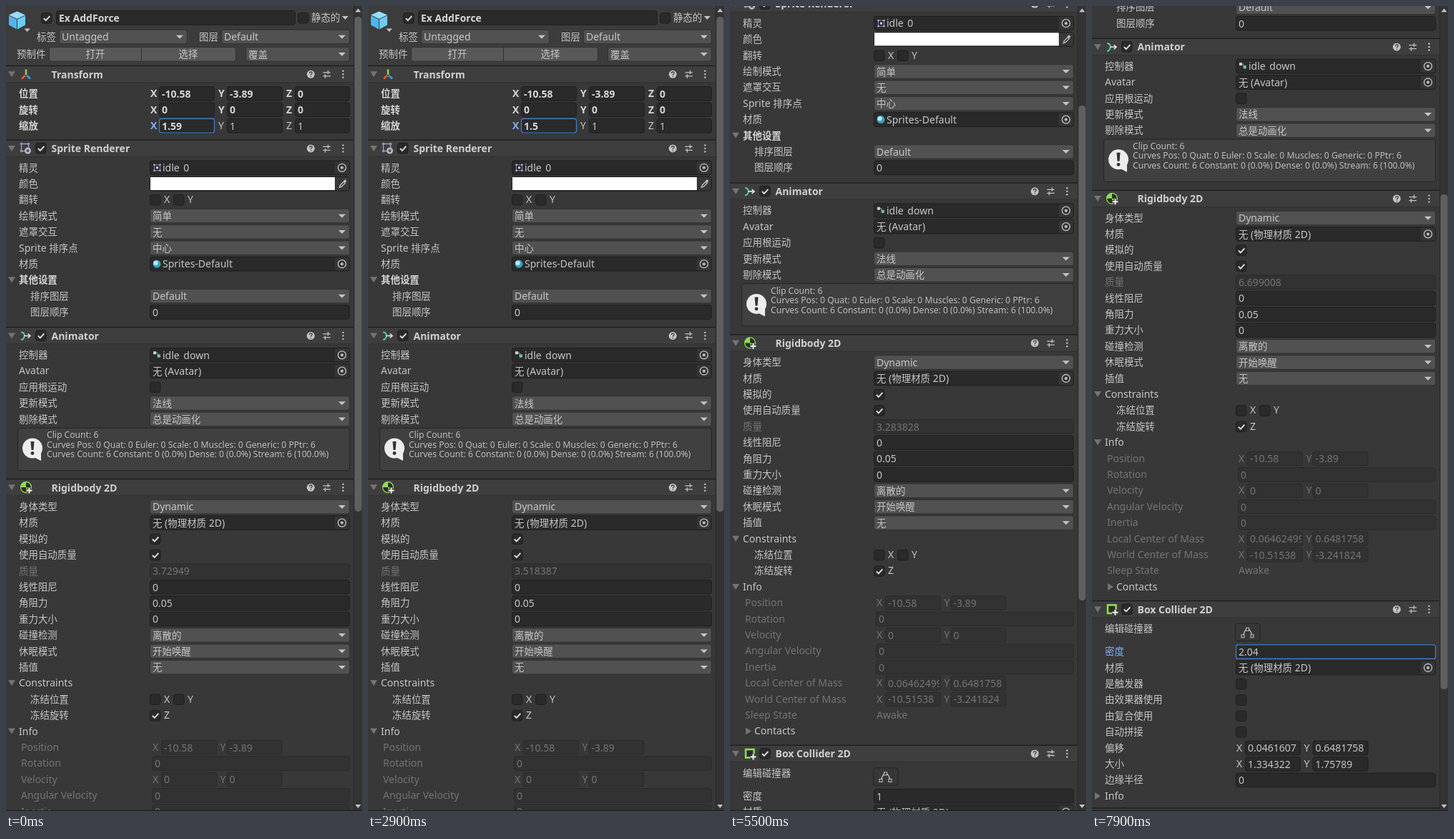
Write an HTML page that moves like this. It is 498 px wide and 1124 px high and loops after 8000 ms.

```html
<!DOCTYPE html>
<html lang="zh-CN">
<head>
<meta charset="utf-8">
<title>Inspector</title>
<style>
html, body { margin: 0; width: 100%; height: 100%; overflow: hidden; background: #383838; }
#stage { display: block; width: 498px; height: 1124px; }
text { font: 14px "Noto Sans", "Noto Sans CJK SC", sans-serif; fill: #c6c6c6; white-space: pre; }
text tspan { font-family: "Noto Sans CJK SC", "Noto Sans CJK JP", "Noto Sans", sans-serif; font-size: 13.44px; }
text.b { font-weight: 600; fill: #d6d6d6; }
text.h { font-weight: 600; fill: #d0d0d0; }
text.off { fill: #747474; }
text.on { fill: #7fb0f8; }
text.s { font-size: 12.15px; fill: #bdbdbd; }
text.m { text-anchor: middle; }
text.gap { word-spacing: 2px; }
.field { fill: #2a2a2a; stroke: #1f1f1f; }
.dim { fill: #323232; stroke: #2b2b2b; }
.drop { fill: #515151; stroke: #313131; }
.tri { fill: #747474; }
.arrow { fill: #c4c4c4; }
.line { fill: none; stroke: #c4c4c4; stroke-width: 1.3; }
.ring { fill: none; stroke-width: 1.2; }
</style>
</head>
<body>
<svg id="stage" viewBox="0 0 498 1124"></svg>
<script>
const PITCH = 22.4, LOOP = 8000, MASS_PER_SCALE = 2.3455912;
const out = [];
const add = s => out.push(s);

const rect = (x, y, w, h, attrs) => add(`<rect x="${x}" y="${y}" width="${w}" height="${h}" ${attrs}/>`);
const path = (d, attrs) => add(`<path d="${d}" ${attrs}/>`);
const dot = (x, y, r, attrs) => add(`<circle cx="${x}" cy="${y}" r="${r}" ${attrs}/>`);
const text = (x, y, s, cls = '', id = '') => {
  const body = s.replace(/[\u4e00-\u9fff]+/g, '<tspan>$&</tspan>');
  add(`<text x="${x}" y="${y}" class="${cls}" ${id && `id="${id}"`}>${body}</text>`);
};
const label = (x, c, s, cls, id) => text(x, c + 4.7, s, cls, id);
const box = (x, c, w, cls) => rect(x + .5, c - 9.8, w - 1, 19.6, `rx="3" class="${cls}"`);

function field(x, c, w, s, cls = '', id = '') {
  box(x, c, w, cls === 'off' ? 'dim' : 'field');
  add(`<svg x="${x + 1}" y="${c - 9}" width="${w - 3}" height="18">`);
  text(3, 14.4, s, cls, id);
  add('</svg>');
}
function drop(c, s, x = 201, w = 280) {
  box(x, c, w, 'drop');
  text(x + 4, c + 5.2, s);
  path(`M${x + w - 16} ${c - 2.3}h10l-5 5z`, 'class="arrow"');
}
function object(c, s, x = 205, cls = '') {
  box(201, c, 280, 'field');
  rect(460, c - 9, 20, 18, 'rx="2" fill="#353535"');
  text(x, c + 5.2, s, cls);
  dot(470, c, 5.5, 'class="line"');
  dot(470, c, 2, 'class="arrow"');
}
function check(x, c, on) {
  rect(x + .5, c - 7, 14.5, 14.5, 'rx="3" class="field"');
  if (on) path(`M${x + 3.8} ${c + .5}l3 3 5.6-6`, 'class="line" style="stroke:#e0e0e0;stroke-width:1.9"');
}
function fold(x, c, open = true) {
  path(open ? `M${x - 5} ${c - 4}h10l-5 8z` : `M${x - 4} ${c - 5}v10l8-5z`, 'class="tri"');
}
function header(c, s, toggle) {
  rect(0, c - 11.6, 486, 23, 'fill="#3e3e3e"');
  rect(0, c - 12.4, 486, 1.2, 'fill="#1b1b1b"');
  rect(0, c + 11, 486, 1, 'fill="#303030"');
  fold(8, c);
  if (toggle) check(41, c - .5, true);
  text(63.5, c + 5.2, s, 'h');
  dot(426.3, c, 5.5, 'class="arrow"');
  path(`M424.5 ${c - 1.3}q0-2 1.9-2t1.8 1.7q0 1-1.7 2v1m0 1.2v1.2`, 'class="line" style="stroke:#3e3e3e"');
  path(`M443.5 ${c - 2.5}h10.5M443.5 ${c + 2.5}h10.5M450.5 ${c - 5.5}v5.5M446.5 ${c}v5.5`, 'class="line"');
  for (const d of [-4.5, 0, 4.5]) dot(471.5, c + d, 1.2, 'class="arrow"');
}
// Two fields with X and Y in front of them
function pair(c, a, b, cls, x = 201) {
  label(x + 1, c, 'X', cls);
  field(x + 13, c, 78, a, cls);
  label(x + 95.5, c, 'Y', cls);
  field(308.5, c, 78, b, cls);
}
const plus = (x, y) => {
  path(`M${x} ${y - 4.5}v9M${x - 4.5} ${y}h9`, 'stroke="#3e3e3e" stroke-width="4.5"');
  path(`M${x} ${y - 4}v8M${x - 4} ${y}h8`, 'stroke="#f0f0f0" stroke-width="2"');
};

function objectHeader() {
  rect(0, 0, 486, 84, 'fill="#3c3c3c"');
  path('M15.5 7.5l11.5 5-11.5 5.5-11.5-5.5z', 'fill="#96defc"');
  path('M4 13.5l11 5.3v13.7l-11-6z', 'fill="#4fb6ee"');
  path('M27 13.5l-11 5.3v13.7l11-6z', 'fill="#6accf8"');
  path('M25.5 31.5h8.5l-4.25 4.5z', 'class="arrow"');
  check(49, 16.7, true);
  box(70, 16.5, 335, 'field');
  text(74, 21.5, 'Ex AddForce', 'b');
  check(408, 16.5);
  label(427, 16.7, '静态的');
  path('M470 14h9l-4.5 5z', 'class="arrow"');
  label(43, 43, '标签');
  drop(43, 'Untagged', 74, 180);
  label(270, 43, '图层');
  drop(43, 'Default', 301, 180);
  label(15, 67.4, '预制件');
  rect(60.5, 57.6, 261, 19.6, 'rx="3" class="drop" style="fill:#585858"');
  rect(189, 58, 1, 19.2, 'fill="#303030"');
  text(125, 72.3, '打开', 'm');
  text(255, 72.3, '选择', 'm');
  drop(67.4, '覆盖', 335, 146);
}

function transform() {
  header(95.3, 'Transform');
  path('M28 96v-7.5', 'stroke="#9bd34a" stroke-width="2.6"');
  path('M27 97l-5 4.5', 'stroke="#ef5b35" stroke-width="2.6"');
  path('M29 97l5 4.5', 'stroke="#3f9df0" stroke-width="2.6"');
  const lines = [['位置', '-10.58', '-3.89', '0'], ['旋转', '0', '0', '0'], ['缩放', '1.59', '1', '1']];
  lines.forEach(([name, ...vals], i) => {
    const c = 122.4 + i * PITCH;
    label(18, c, name, 'b');
    vals.forEach((v, k) => {
      const x = [214, 309, 404][k], active = i === 2 && !k, cls = i < 2 || !k ? 'b' : '';
      label(x - 12, c, 'XYZ'[k], active ? 'b on' : cls);
      field(x, c, k < 2 ? 78 : 77, v, cls, active ? 'scale' : '');
    });
  });
  rect(214.5, 157.4, 77, 19.6, 'rx="3" class="ring" stroke="#3e82cf"');
}

// Runs row drawers on a regular pitch; each entry is [label, drawer, indent, class, id]
function rows(top, list) {
  list.forEach(([name, draw, x = 18, cls = '', id = ''], i) => {
    const c = +(top + i * PITCH).toFixed(1);
    label(x, c, name, cls, id);
    draw(c);
  });
}
const pick = s => c => drop(c, s);
const obj = s => c => object(c, s);
const num = (s, cls, id) => c => field(201, c, 280, s, cls, id);
const tick = on => c => check(201, c, on);
const open = c => fold(8, c - .3);
const infoNum = c => field(204, c, 277, '0', 'off');
const infoPair = (a, b) => c => pair(c, a, b, 'off', 204);
const axes = c => {
  check(201, c); label(221, c, 'X');
  check(234, c); label(254, c, 'Y');
};

function spriteRenderer() {
  header(198.9, 'Sprite Renderer', true);
  rect(21.5, 192.5, 10, 10, 'fill="none" stroke="#a9a9a9" stroke-width="1.3"');
  for (const [x, y] of [[21.5, 192.5], [31.5, 192.5], [21.5, 202.5]]) dot(x, y, 1.8, 'fill="#9d8be8"');
  dot(30.5, 202, 4.5, 'fill="#b8b8c4"');
  dot(30.5, 202, 2, 'fill="#55506f"');
  rows(225.8, [
    ['精灵', c => {
      object(c, 'idle 0', 219, 'gap');
      rect(207.5, c - 4, 8, 8, 'fill="none" stroke="#8d7fd0"');
      for (const k of [0, 1, 2, 3]) dot(207.5 + 8 * (k & 1), c - 4 + 8 * (k >> 1), 1.2, 'fill="#c3b8f5"');
      rect(210, c - 1.5, 3, 3, 'fill="#d0d0d0"');
    }],
    ['颜色', c => {
      box(201, c, 280, 'field');
      rect(202, c - 9.2, 258, 18, 'fill="#fff"');
      rect(460, c - 9, 20, 18, 'fill="#383838"');
      path(`M466.5 ${c + 5}l1-3 5-5 2 2-5 5z`, 'class="line"');
      path(`M472 ${c - 4}l2.5-2 2 2-2 2.5z`, 'class="arrow"');
    }],
    ['翻转', axes],
    ['绘制模式', pick('简单')],
    ['遮罩交互', pick('无')],
    ['Sprite 排序点', pick('中心')],
    ['材质', c => {
      object(c, 'Sprites-Default', 219);
      dot(211, c, 5.5, 'fill="#3d9fc4"');
      dot(209.5, c - 1.5, 3.2, 'fill="#b8eaf8"');
    }],
    ['其他设置', open, 18, 'b'],
    ['排序图层', pick('Default'), 34],
    ['图层顺序', num('0'), 34]
  ]);
}

function animator() {
  header(460.4, 'Animator', true);
  path('M21 455.5q4 0 5 4.5M21 466q4 0 5-6', 'fill="none" stroke="#4fcf9c" stroke-width="2"');
  path('M25 460.5h9m-3.5-3l3.5 3-3.5 3', 'fill="none" stroke="#e0e0e0" stroke-width="1.6"');
  rows(487.3, [
    ['控制器', c => {
      object(c, 'idle down', 219, 'gap');
      path(`M208 ${c - 3}h4v6h3`, 'fill="none" stroke="#9a9a9a"');
      rect(206, c - 5, 4, 4, 'fill="#d0d0d0"');
      rect(212, c - 1, 4, 4, 'fill="#58c79a"');
    }],
    ['Avatar', obj('无 (Avatar)')],
    ['应用根运动', tick(false)],
    ['更新模式', pick('法线')],
    ['剔除模式', pick('总是动画化')]
  ]);
  rect(16.5, 589.2, 464, 59.5, 'rx="3" fill="#404040" stroke="#242424"');
  dot(37, 617.5, 14, 'fill="#ececec"');
  path('M49 622v13l-10-5z', 'fill="#ececec"');
  path('M34.5 608h5l-1 12h-3z', 'fill="#333"');
  dot(37, 624.5, 2.4, 'fill="#333"');
  ['Clip Count: 6',
    'Curves Pos: 0 Quat: 0 Euler: 0 Scale: 0 Muscles: 0 Generic: 0 PPtr: 6',
    'Curves Count: 6 Constant: 0 (0.0%) Dense: 0 (0.0%) Stream: 6 (100.0%)'
  ].forEach((s, i) => text(57, 603.2 + i * 13.5, s, 's'));
}

function rigidbody() {
  header(672.3, 'Rigidbody 2D');
  dot(28, 672, 7.5, 'fill="#2c2c2c" stroke="#8ddc4e" stroke-width="1.3"');
  path('M28 672v-7.5a7.5 7.5 0 0 0-7.5 7.5zM28 672v7.5a7.5 7.5 0 0 0 7.5-7.5z', 'fill="#8ddc4e"');
  plus(32.5, 676.5);
  const off = (name, draw) => [name, draw, 21, 'off'];
  rows(699.2, [
    ['身体类型', pick('Dynamic')],
    ['材质', obj('无 (物理材质 2D)')],
    ['模拟的', tick(true)],
    ['使用自动质量', tick(true)],
    ['质量', num('', 'off', 'mass'), 18, 'off'],
    ['线性阻尼', num('0')],
    ['角阻力', num('0.05')],
    ['重力大小', num('0')],
    ['碰撞检测', pick('离散的')],
    ['休眠模式', pick('开始唤醒')],
    ['插值', pick('无')],
    ['Constraints', open],
    ['冻结位置', axes, 34],
    ['冻结旋转', c => { check(201, c, true); label(221, c, 'Z'); }, 34],
    ['Info', open],
    off('Position', infoPair('-10.58', '-3.89')),
    off('Rotation', infoNum),
    off('Velocity', infoPair('0', '0')),
    off('Angular Velocity', infoNum),
    off('Inertia', infoNum),
    off('Local Center of Mass', infoPair('0.06462499', '0.6481758')),
    off('World Center of Mass', infoPair('-10.51538', '-3.241824')),
    off('Sleep State', c => label(205, c, 'Awake', 'off')),
    ['Contacts', c => fold(26, c - .3, false), 34]
  ]);
}

function boxCollider() {
  header(1245.6, 'Box Collider 2D', true);
  rect(22, 1239.6, 11.5, 11.5, 'fill="#2c2c2c" stroke="#8ddc4e" stroke-width="2.6"');
  plus(32.5, 1250);
  label(18, 1272.6, '编辑碰撞器');
  rect(200.5, 1265.4, 34.5, 24.5, 'rx="3" fill="#373737" stroke="#222"');
  path('M212 1282q1-8 5.5-9q5 1 6 9', 'class="line"');
  for (const [x, y] of [[209, 1281], [215.5, 1271.5], [222, 1281]]) rect(x, y, 4, 4, 'fill="#383838" stroke="#c4c4c4"');
  rows(1304.8, [
    ['密度', c => {
      field(201, c, 280, '');
      rect(204.5, c - 7.5, 9.5, 15.5, 'id="select" fill="#3a6ea8"');
      text(205, c + 5.4, '1', '', 'density');
      rect(201.5, c - 9.8, 279, 19.6, 'id="focus" rx="3" class="ring" stroke="#3e82cf"');
    }, 18, '', 'densityLabel'],
    ['材质', obj('无 (物理材质 2D)')],
    ['是触发器', tick(false)],
    ['由效果器使用', tick(false)],
    ['由复合使用', tick(false)],
    ['自动拼接', tick(false)],
    ['偏移', c => pair(c, '0.0461607', '0.6481758')],
    ['大小', c => pair(c, '1.334322', '1.75789')],
    ['边缘半径', num('0')],
    ['Info', c => fold(8, c - .3, false)]
  ]);
  rect(0, 1522.5, 486, 1.2, 'fill="#1b1b1b"');
}

function scrollbar() {
  rect(486, 0, 12, 1124, 'fill="#333"');
  rect(486, 0, 1, 1124, 'fill="#2a2a2a"');
  rect(487.5, 0, 10, 691, 'id="thumb" rx="4.5" fill="#5f5f5f"');
  path('M488.5 8.5h8l-4-5z', 'class="arrow"');
  path('M488.5 1115h8l-4 5z', 'class="arrow"');
  rect(0, 1122.8, 498, 1.2, 'fill="#241c1f"');
}

add('<g id="page">');
[objectHeader, transform, spriteRenderer, animator, rigidbody, boxCollider].forEach(part => part());
rect(0, 0, 0, 0, 'id="hover" rx="3" class="ring" stroke="#686868"');
add('</g>');
scrollbar();
document.getElementById('stage').innerHTML = out.join('');

// Hard steps: [start ms, value]
const scaleSteps = [[0, 1.59], [2900, 1.5], [3000, 1.41], [3100, 1.25]];
[1.22, 1.16, 1.1, 1.07, 1.04, 1.1, 1.16, 1.22, 1.28, 1.31, 1.34, 1.37]
  .forEach((v, i) => scaleSteps.push([3400 + i * 100, v]));
scaleSteps.push([4700, 1.39], [4800, 1.4]);
const densitySteps = [[0, 1], [7600, 1.24], [7700, 1.56], [7800, 1.87], [7900, 2.04]];
const scrollSteps = [[0, 0], [5500, 201.6], [5900, 403.2]];
const wide = c => [201.5, c - 9.8, 279, 19.6], small = c => [201.5, c - 7, 14.5, 14.5], none = [0, 0, 0, 0];
const hoverSteps = [
  [0, none], [200, wide(487.3)], [300, wide(554.5)], [400, wide(576.9)], [500, wide(721.6)],
  [700, small(744)], [800, small(766.4)], [900, wide(811.2)], [1000, none],
  [1600, small(270.6)], [1700, [214.5, 135, 77, 19.6]], [1800, none],
  [6400, wide(1304.8)], [6700, none]
];
const at = (steps, t) => steps.reduce((v, [start, next]) => t >= start ? next : v, null);

const el = {};
for (const id of ['page', 'scale', 'mass', 'density', 'densityLabel', 'select', 'focus', 'hover', 'thumb'])
  el[id] = document.getElementById(id);
const show = (node, on) => node.setAttribute('visibility', on ? 'visible' : 'hidden');

function draw(t) {
  const scale = at(scaleSteps, t), density = at(densitySteps, t), scroll = at(scrollSteps, t);
  const hover = at(hoverSteps, t), focused = t >= 6700;
  el.scale.textContent = scale;
  el.mass.textContent = +(MASS_PER_SCALE * scale * density).toPrecision(7);
  el.density.textContent = density;
  el.densityLabel.setAttribute('class', focused ? 'on' : '');
  show(el.focus, focused);
  show(el.select, t >= 6800 && t < 7300);
  show(el.hover, hover !== none);
  ['x', 'y', 'width', 'height'].forEach((k, i) => el.hover.setAttribute(k, hover[i]));
  el.page.setAttribute('transform', `translate(0 ${-scroll})`);
  el.thumb.setAttribute('y', 15 + scroll * 0.615);
}

const begin = performance.now();
function frame() {
  draw((performance.now() - begin) % LOOP);
  requestAnimationFrame(frame);
}
frame();
</script>
</body>
</html>
```
